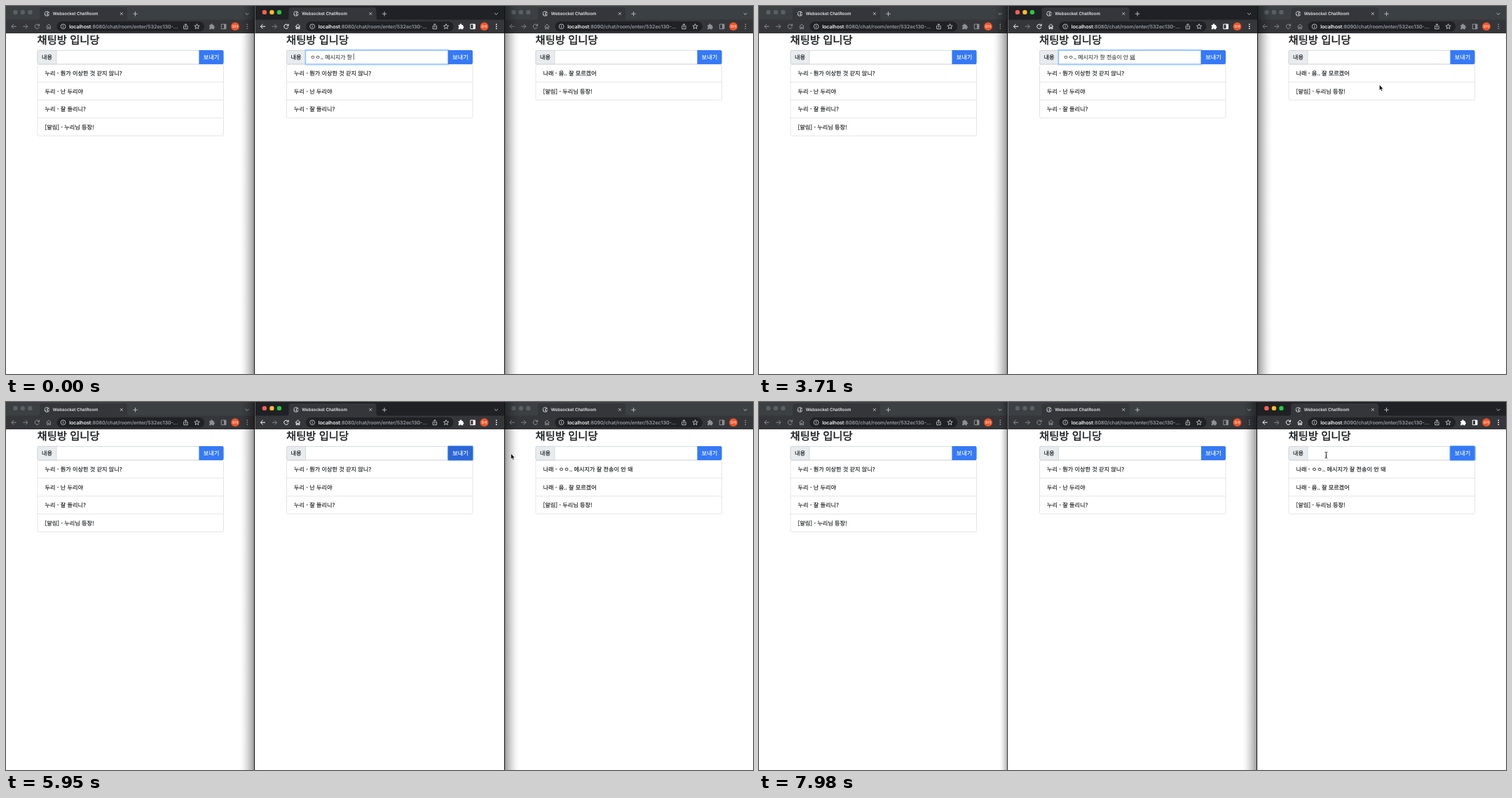
Recreate the animation shown at these times as an HTML page. Size 1066 px wide and 525 px high, loop 8000 ms.

```html
<!DOCTYPE html>
<html lang="ko">
<head>
<meta charset="utf-8">
<title>Websocket ChatRoom</title>
<style>
html, body { margin: 0; width: 100%; height: 100%; overflow: hidden; background: #fff; }
svg { display: block; }
text {
  font: 8.13px 'Noto Sans CJK KR', 'Noto Sans CJK', sans-serif;
  white-space: pre; text-rendering: geometricPrecision;
  color: #16181b; fill: currentColor; stroke: currentColor; stroke-width: .14;
}
.ui text { font-family: Inter, Roboto, sans-serif; font-weight: 500; color: #e4e6e9; stroke-width: .08; }
.ui .tab { font-size: 6.1px; }
.ui .url { font-size: 7.15px; color: #9aa0a6; }
.ui .host { color: #fff; fill: #fff; stroke: #fff; }
.ui .who { font: 500 4.6px 'Noto Sans CJK KR', 'Noto Sans CJK', sans-serif; color: #fff; }
.strip { fill: #3c4043; }
.icon { fill: none; stroke: #8d9196; stroke-width: 1; }
.solid { fill: #8d9196; stroke: none; }
.lights circle { fill: #5c5f63; }
.on .strip { fill: #202124; }
.on .icon { stroke: #fff; }
.on .solid { fill: #fff; stroke: none; }
.icon.soft { stroke: #b4b8bc; }
.icon.dim { stroke: #85888c; }
.on .lights circle:nth-child(1) { fill: #fe5f57; }
.on .lights circle:nth-child(2) { fill: #febc2e; }
.on .lights circle:nth-child(3) { fill: #28c840; }
.title { font-size: 15.35px; font-weight: 500; stroke-width: .4; }
.send { color: #fff; font-weight: 500; }
.typed { font-size: 7.88px; color: #3d444b; }
.line { fill: none; stroke: #dfdfdf; stroke-width: .8; }
</style>
</head>
<body>
<svg id="stage" width="1066" height="525" viewBox="0 0 1066 525"></svg>
<script>
const LOOP = 8000, STEP = 70, PITCH = 355.5;
const SWITCH = 7840;              // the right window takes the focus
const PRESS = 4900, SENT = 4970;
const stage = document.getElementById('stage');

const text = (x, y, s, cls = '') => `<text x="${x}" y="${y}" class="${cls}">${s}</text>`;
const box = (x, y, w, h, attrs) => `<rect x="${x}" y="${y}" width="${w}" height="${h}" ${attrs}/>`;
const icon = (d, cls = '') => `<path class="icon ${cls}" d="${d}"/>`;
const ring = (x, y, r, cls = '') => `<circle class="icon ${cls}" cx="${x}" cy="${y}" r="${r}"/>`;

const star = Array.from({ length: 10 }, (_, k) => {
  const a = k * Math.PI / 5 - Math.PI / 2, r = k % 2 ? 1.7 : 3.9;
  return `${272.5 + r * Math.cos(a)} ${29.4 + r * Math.sin(a)}`;
}).join('L');

function toolbar(port) {
  const lights = [13.4, 23.9, 34.4].map(x => `<circle cx="${x}" cy="8.9" r="3.2"/>`).join('');
  const dots = [26.2, 29.2, 32.2].map(y => `<circle class="solid" cx="344.3" cy="${y}" r=".85"/>`).join('');
  return `<g class="ui">
    ${box(0, 0, 356, 20, 'class="strip"')}${box(0, 19.5, 356, 19.5, 'fill="#35363a"')}
    <path fill="#35363a" d="M44 20Q48 20 48 16V6Q48 2 52 2H169Q173 2 173 6V16Q173 20 177 20Z"/>
    <g class="lights">${lights}</g>
    <circle cx="58.4" cy="11" r="3.7" fill="#a4a8ad"/>
    <path fill="#35363a" d="M55.6 9.5L58 8.3 59.2 9.6 57.8 11 58.8 12.4 57.6 14 56.4 11.6ZM59.8 10.2L61.6 9.6 61.5 12 60.2 12.6Z"/>
    ${text(66.8, 13.2, 'Websocket ChatRoom', 'tab')}
    ${icon('M162.9 9.1l3.8 3.8m0-3.8l-3.8 3.8', 'soft')}
    ${icon('M184.5 8v6.4m-3.2-3.2h6.4M341.6 10l2.4 2.4 2.4-2.4', 'soft')}
    ${icon('M14.5 29.2H8m3-3.2l-3.2 3.2 3.2 3.2')}
    ${icon('M24.3 29.2h6.5m-3-3.2l3.2 3.2-3.2 3.2', 'dim')}
    ${icon('M47 27.5A3.1 3.1 0 1 0 47.3 30.3M47.6 25.6V28.2H45')}
    ${icon('M57.6 29.3L61 26l3.4 3.3M58.7 28.7v3.9h1.5v-2.4h1.6v2.4h1.5v-3.9')}
    ${box(72.5, 22, 210.5, 14.6, 'rx="7.3" fill="#202124"')}
    ${ring(81.6, 29.2, 3.4, 'soft')}${icon('M81.6 28.6v2.4m0-3.9v.9', 'soft')}
    <text x="90.2" y="31.8" class="url"><tspan class="host">localhost</tspan>:${port}/chat/room/enter/532ec130-...</text>
    ${icon('M255 28.3h-1.3v4.4h5.4v-4.4h-1.3M256.4 31v-5.6m-1.7 1.6l1.7-1.7 1.7 1.7', 'soft')}
    ${icon('M' + star + 'Z', 'soft')}
    <path class="solid" d="M290.2 27h2a1.3 1.3 0 1 1 2.5 0h2v2.1a1.2 1.2 0 1 1 0 2.4v1.7h-2.2a1.2 1.2 0 0 0-2.3 0h-2v-2.3a1.2 1.2 0 0 0 0-2.2Z"/>
    ${icon('M307.3 26h6.6v6.6h-6.6Z')}${box(311, 26, 3, 6.6, 'class="solid"')}
    <circle cx="327" cy="29.2" r="5.9" fill="#ee562a"/>${text(322.8, 31, '모아', 'who')}
    ${dots}</g>`;
}

function list(rows) {
  const lines = rows.map((s, i) =>
    text(55.5, 99 + i * 25.5, s) + (i ? `<path class="line" d="M45 ${83.2 + i * 25.5}h265.5"/>` : '')).join('');
  return box(45, 83.2, 265.5, rows.length * 25.5, 'rx="2" class="line"') + lines;
}

function win(i, port, rows) {
  return `<g class="win" transform="translate(${i * PITCH})">
    ${box(0, 0, 356, 525, 'fill="#fff"')}${toolbar(port)}
    ${text(44.6, 54.2, '채팅방 입니당', 'title')}
    <g class="list">${list(rows)}</g>
    ${box(45, 63.4, 265, 19.4, 'rx="2" fill="#fff" stroke="#ced4da" stroke-width=".8"')}
    <path d="M72 63.4H47Q45 63.4 45 65.4V80.8Q45 82.8 47 82.8H72Z" fill="#e9ecef" stroke="#ced4da" stroke-width=".8"/>
    ${text(51, 75.9, '내용')}
    <g class="focus" opacity="0">
      ${box(71.6, 62.6, 204.3, 21, 'fill="#fff" stroke="#b4d6fd" stroke-width="2"')}
      ${box(72.2, 63.4, 203, 19.4, 'fill="#fff" stroke="#80b8f8" stroke-width=".9"')}
    </g>
    <text class="typed" x="78.7" y="75.5"></text>
    ${box(0, 75.9, 0, .8, 'class="under" fill="#333"')}
    ${box(0, 67.6, .8, 9, 'class="caret" fill="#333" display="none"')}
    ${box(274.3, 62, 37.4, 22, 'class="glow" rx="2.5" fill="#86b9fb" opacity="0"')}
    <path d="M275.4 63H308.5Q310.5 63 310.5 65V81Q310.5 83 308.5 83H275.4Z" fill="#3579f6"/>
    ${box(275.4, 63, 35.1, 20, 'class="hover" rx="1" fill="#2b67d9" opacity="0"')}
    ${text(281.7, 75.9, '보내기', 'send')}
  </g>`;
}

const fade = (id, dir, alpha) => `<linearGradient id="${id}" x1="${dir}" x2="${1 - dir}">` +
  [0, .25, .5, .75, 1].map(p => `<stop offset="${p}" stop-opacity="${alpha * p ** 1.5}"/>`).join('') + '</linearGradient>';

const before = ['나래 - 음.. 잘 모르겠어', '[알림] - 두리님 등장!'];
const after = ['나래 - ㅇㅇ.. 메시지가 잘 전송이 안 돼', ...before];
const talk = ['누리 - 뭔가 이상한 것 같지 않니?', '두리 - 난 두리야', '누리 - 잘 들리니?'];

stage.innerHTML = `<defs>${fade('left', 0, .4)}${fade('right', 1, .4)}${fade('small', 0, .32)}</defs>` +
  win(0, 8080, [...talk, '[알림] - 누리님 등장!']) + win(1, 8080, talk) + win(2, 8090, before) +
  `<g id="midShade">${box(334, 0, 20.5, 525, 'fill="url(#left)"')}${box(711.5, 0, 20.5, 525, 'fill="url(#right)"')}
    ${box(354, 0, 1, 525, 'fill="#111"')}${box(711, 0, 1, 525, 'fill="#111"')}</g>
  <g id="rightShade">${box(343, 0, 11.5, 525, 'fill="url(#small)"')}${box(690, 0, 20.5, 525, 'fill="url(#left)"')}
    ${box(354, 0, 1, 525, 'fill="#333"')}${box(710, 0, 1, 525, 'fill="#111"')}</g>
  <g id="cursor">
    <path d="M0 0V8L1.8 6.4 3 9.1 4.4 8.5 3.2 5.9H5.6Z" fill="#000" stroke="#fff" stroke-width=".6"/>
    <path d="M-.9 5V.8Q0-.6.8.8V3Q1.8 2.4 2.2 3.3 3.2 2.9 3.4 3.8 4.4 3.6 4.4 4.8V6.2L3.4 8.8H-.9L-3.2 5.4Q-2.9 4.1-1.8 4.8Z" fill="#fff" stroke="#111" stroke-width=".8"/>
    <path d="M-1.8-4Q0-4 0-3 0-4 1.8-4M0-3V3.6M-1.8 4.6Q0 4.6 0 3.6 0 4.6 1.8 4.6M-.9 1.6H.9" fill="none" stroke="#111" stroke-width=".9"/>
  </g>`;

const wins = [...stage.querySelectorAll('.win')];
const part = (i, name) => wins[i].querySelector('.' + name);
const typed = part(1, 'typed'), under = part(1, 'under'), caret = part(1, 'caret');
const cursor = document.getElementById('cursor');
const show = (el, on) => el.setAttribute('display', on ? 'inline' : 'none');
const ramp = (t, from) => Math.min(1, Math.max(0, (t - from) / 140));

// time, committed text, syllable being composed
const lead = 'ㅇㅇ.. 메시지가 잘 ';
const typing = [
  [0, '', ''], [1120, '', 'ㅈ'], [1260, '', '저'], [1400, '', '전'],
  [1610, '전', 'ㅅ'], [1820, '전', '소'], [1960, '전', '송'], [2030, '전송', '이'],
  [2100, '전송이 ', ''], [2240, '전송이 ', 'ㅇ'], [2380, '전송이 ', '아'], [2520, '전송이 안 ', ''],
  [2800, '전송이 안 ', 'ㄷ'], [2870, '전송이 안 ', '도'], [2940, '전송이 안 ', '돼'], [PRESS, '전송이 안 돼', '']
];
const blinks = [210, 770, 3430, 3920, 4410];
const path = [
  [3570, 901, 130], [3710, 885.3, 112.3], [4340, 654, 81.6], [4410, 654, 81.6], [4550, 653, 74],
  [5880, 653, 74], [5950, 720.6, 73.6], [6090, 725.2, 75], [6720, 725.2, 75],
  [7210, 826.4, 76], [7560, 826.4, 76], [SWITCH, 809.4, 75.5], [LOOP, 809.4, 75.5]
];

function measure(s) {
  typed.textContent = s;
  return typed.getComputedTextLength();
}

function drawInput(t) {
  const [, done, open] = typing.findLast(k => k[0] <= t);
  const left = typed.x.baseVal[0].value;
  const start = left + measure(lead + done), end = left + measure(lead + done + open);
  if (t >= SENT) typed.textContent = '';
  under.setAttribute('x', start);
  under.setAttribute('width', end - start);
  caret.setAttribute('x', end - .2);
  show(caret, t < PRESS && blinks.filter(b => b <= t).length % 2 === 0);
}

function drawCursor(t) {
  show(cursor, t >= path[0][0]);
  if (t < path[0][0]) return;
  const n = path.findIndex(k => k[0] > t), a = path[n - 1], b = path[n];
  const p = (t - a[0]) / (b[0] - a[0]), e = p * p * (3 - 2 * p);
  const x = a[1] + (b[1] - a[1]) * e, y = a[2] + (b[2] - a[2]) * e;
  const kind = t >= SWITCH ? 2 : x < 666 ? 1 : 0;
  cursor.setAttribute('transform', `translate(${x} ${y})`);
  [...cursor.children].forEach((c, i) => show(c, i === kind));
}

let last = -1, sent = null;
function draw(t) {
  const active = t < SWITCH ? 1 : 2;
  wins.forEach((w, i) => w.classList.toggle('on', i === active));
  show(document.getElementById('midShade'), active === 1);
  show(document.getElementById('rightShade'), active === 2);
  drawInput(t);
  part(1, 'focus').setAttribute('opacity', 1 - ramp(t, PRESS));
  part(1, 'glow').setAttribute('opacity', ramp(t, PRESS - 70) - ramp(t, SWITCH));
  part(1, 'hover').setAttribute('opacity', ramp(t, 4280) - ramp(t, 5950));
  part(2, 'glow').setAttribute('opacity', ramp(t, SWITCH));
  if (sent !== t >= SENT) {
    sent = t >= SENT;
    part(2, 'list').innerHTML = list(sent ? after : before);
  }
  drawCursor(t);
}

function tick() {
  const t = Math.floor(performance.now() % LOOP / STEP) * STEP;
  if (t !== last) draw(last = t);
  requestAnimationFrame(tick);
}
tick();
</script>
</body>
</html>
```
